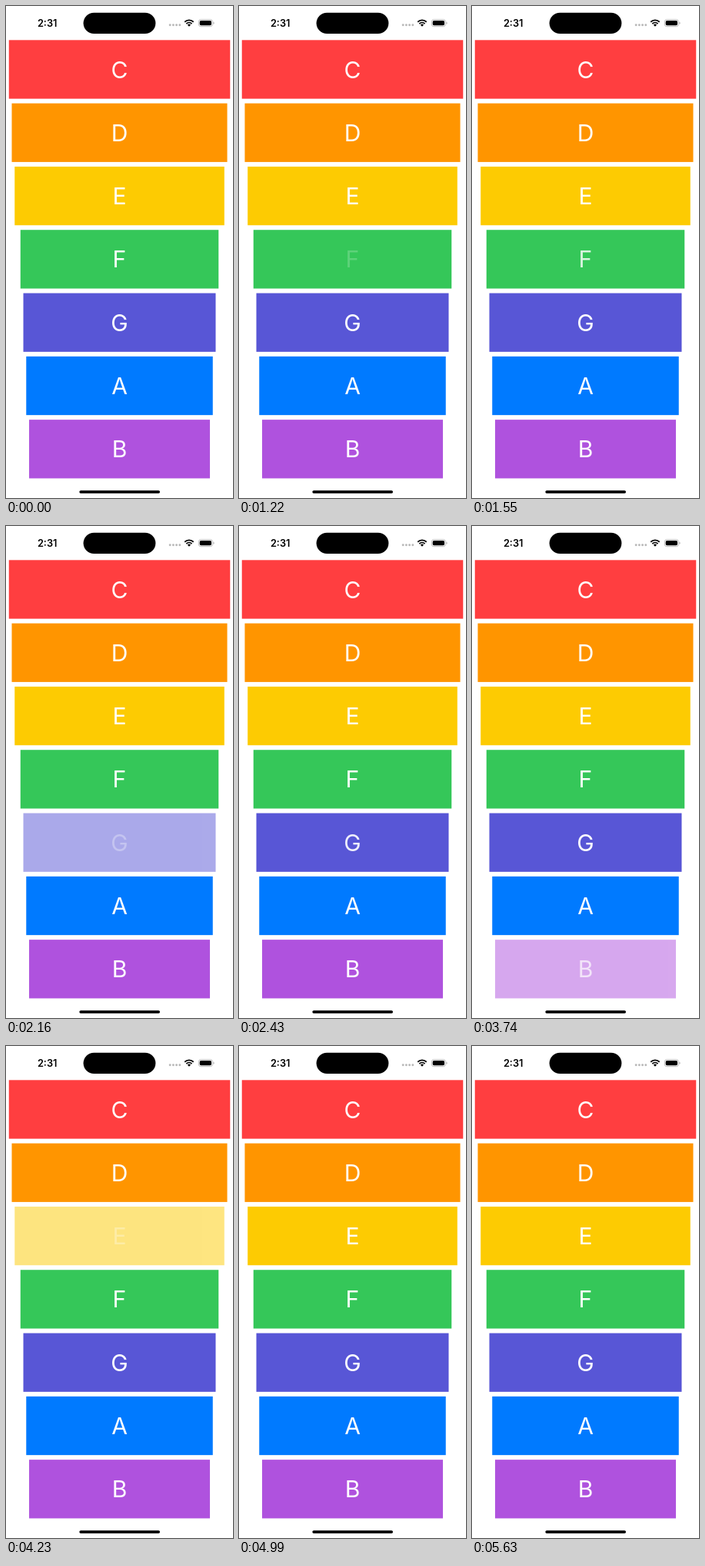
An HTML page for the animation above (5.69 s loop, 295 by 640 pixels).

```html
<!DOCTYPE html>
<html lang="en">
<head>
<meta charset="utf-8">
<title>Xylophone</title>
<style>
  html, body { margin: 0; width: 100%; height: 100%; overflow: hidden; background: #fff; }
  svg { display: block; width: 100vw; height: 100vh; }
  text { font-family: Inter, "Liberation Sans", sans-serif; text-anchor: middle; }
  .note { font-size: 40px; fill: #fff; }
  .clock { font-size: 17px; font-weight: 600; }
</style>
</head>
<body>
<svg viewBox="0 0 393 852" preserveAspectRatio="none">
  <text class="clock" x="71.5" y="35.5">2:31</text>
  <rect x="134" y="11.5" width="125" height="36.5" rx="18.25"/>
  <g fill="#b8b8b8">
    <circle cx="284" cy="33" r="1.9"/><circle cx="289.6" cy="33" r="1.9"/>
    <circle cx="295.2" cy="33" r="1.9"/><circle cx="300.8" cy="33" r="1.9"/>
  </g>
  <g fill="none" stroke="#000" stroke-width="2.4">
    <path d="M309.4 27.6a11 11 0 0 1 15.2 0"/>
    <path d="M312.2 30.7a7 7 0 0 1 9.6 0"/>
  </g>
  <path d="M317 35.6l-2.8-2.9a4 4 0 0 1 5.6 0z"/>
  <rect x="333.5" y="23.5" width="24" height="12" rx="3.8" fill="none" stroke="#a6a6a6"/>
  <rect x="335.3" y="25.3" width="20.4" height="8.4" rx="2.3"/>
  <path d="M359 27.4v4.2a2.3 2.3 0 0 0 0-4.2z" fill="#a6a6a6"/>
  <g id="keys"></g>
  <rect x="127" y="839" width="139.5" height="5" rx="2.5"/>
</svg>
<script>
const LOOP = 5690, FADE = 460, DIM_HOLD = 200, DIM_TITLE = 0.2;
const BARS = [
  ['C', 5, '#ff3e40'], ['D', 10, '#ff9500'], ['E', 15, '#fdcb02'],
  ['F', 25, '#35c759'], ['G', 30, '#5856d6'], ['A', 35, '#007aff'], ['B', 40, '#af52de']
];
// note, finger down, finger up (ms)
const TAPS = [
  ['F', 1220, 1310], ['G', 2040, 2130], ['A', 2920, 3025],
  ['B', 3500, 3565], ['E', 4110, 4200], ['F', 5140, 5185]
];
const TOP = 59, HEIGHT = 101.57, PITCH = 109.57;

function add(parent, tag, attrs) {
  const el = document.createElementNS('http://www.w3.org/2000/svg', tag);
  for (const k in attrs) el.setAttribute(k, attrs[k]);
  return parent.appendChild(el);
}

const keys = BARS.map(([note, inset, fill], i) => {
  const y = TOP + i * PITCH;
  const bar = add(document.getElementById('keys'), 'g', {});
  add(bar, 'rect', { x: inset, y, width: 393 - 2 * inset, height: HEIGHT, fill });
  const title = add(bar, 'text', { class: 'note', x: 196.5, y: y + HEIGHT / 2 + 14.8 });
  title.textContent = note;
  return { bar, title, taps: TAPS.filter(tap => tap[0] === note) };
});

function titleAlpha(t, up) {
  const p = Math.min(Math.max((t - up) / FADE, 0), 1);
  return DIM_TITLE + (1 - DIM_TITLE) * (1 - (1 - p) ** 2);
}

function draw(now) {
  const t = now % LOOP;
  for (const { bar, title, taps } of keys) {
    const tap = taps.find(([, down, up]) => t >= down && t < up + FADE);
    const up = tap ? tap[2] : 0;
    title.style.opacity = tap ? titleAlpha(t, up) : 1;
    bar.style.opacity = tap && t >= up && t < up + DIM_HOLD ? 0.5 : 1;
  }
}

const start = performance.now();
function tick() {
  draw(performance.now() - start);
  requestAnimationFrame(tick);
}
tick();
</script>
</body>
</html>
```
